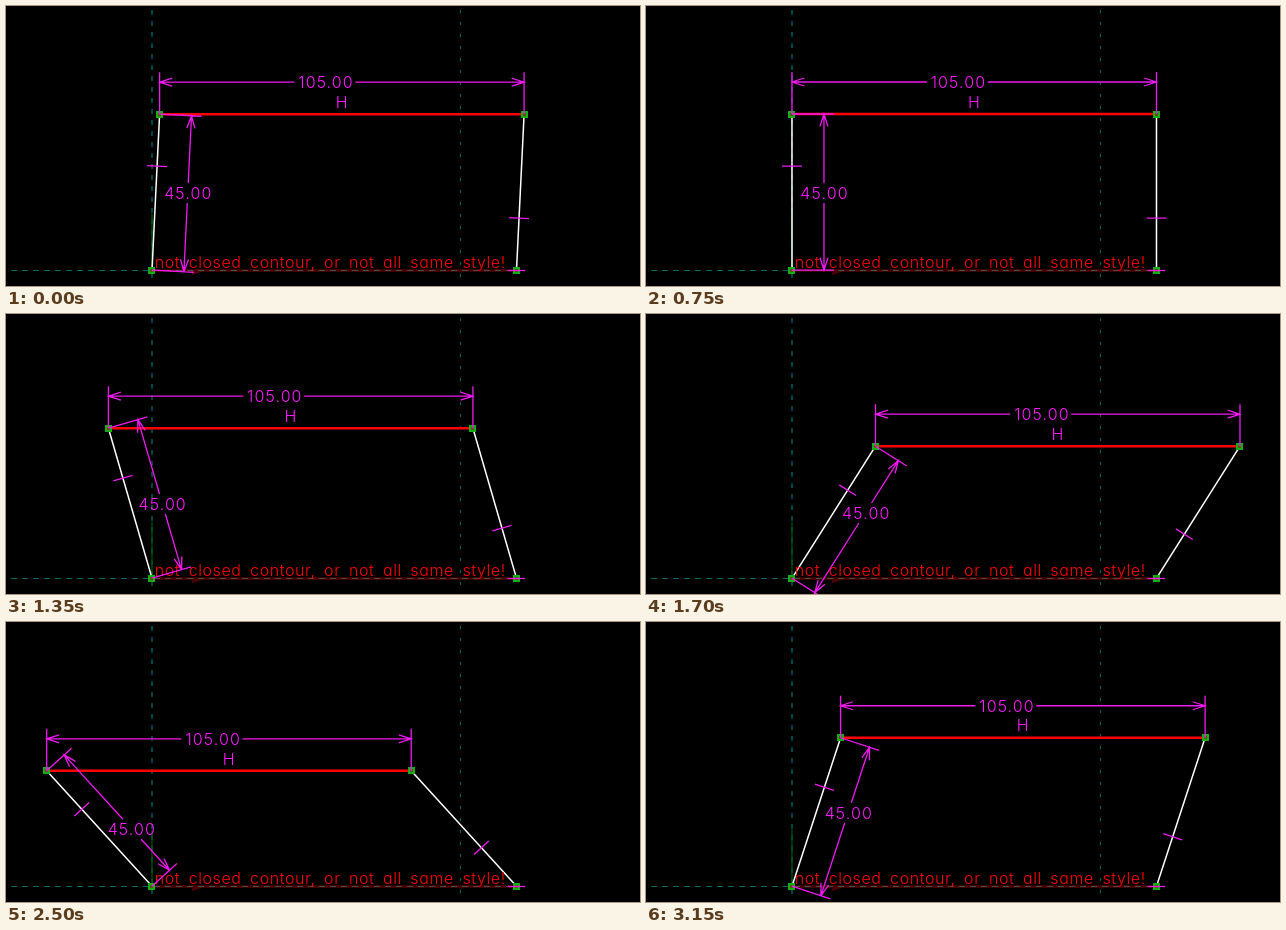
These frames come from a looping animation (634x280 px, 3200 ms). An HTML page:

```html
<!DOCTYPE html>
<html lang="en">
<head>
<meta charset="utf-8">
<title>Parallelogram linkage sketch</title>
<style>
  html, body { margin: 0; width: 100%; height: 100%; overflow: hidden; background: #000; }
  svg { display: block; width: 634px; height: 280px; }
  path { fill: none; }
  text { font: 300 16px Inter, "Open Sans", sans-serif; font-feature-settings: "cv11"; }
  .axis { stroke: #006a66; }
  .dim { stroke: #f01af0; stroke-width: 1.3; }
  .label { fill: #ff1aff; text-anchor: middle; letter-spacing: 1.1px; }
  .note { fill: #ff0000; letter-spacing: .6px; word-spacing: 3.4px; }
  .bar { stroke: #fff; stroke-width: 1.5; }
  .base { stroke: #f00; stroke-width: 2.5; opacity: .3; }
  .top { stroke: #f00; stroke-width: 2.5; }
  .top.faint { stroke: #a83c3c; stroke-width: 2; }
  .pin { fill: #12b012; }
  .core { fill: #6a4a18; }
</style>
</head>
<body>
<svg viewBox="0 0 634 280">
  <path class="axis" d="M5 264.5H520" stroke-dasharray="6 5"/>
  <path class="axis" d="M146 4V272" stroke-width="1.3" stroke-dasharray="5 6"/>
  <path class="axis" d="M454.5 4V272" stroke-dasharray="3 9"/>
  <path d="M146 208V264" stroke="#005000" stroke-width="1.3"/>
  <path class="base" d="M146 264.5H510.5M186 268L196 264"/>
  <path class="bar" id="bars"/>
  <path class="top" id="top"/>
  <g id="pins"></g>
  <text class="note" x="148.7" y="262.3">not closed contour, or not all same style!</text>
  <path class="dim" d="M502 264.5H519"/>
  <path class="dim" id="dims"/>
  <text class="label" id="width">105.00</text>
  <text class="label" id="length">45.00</text>
  <text class="label" id="level">H</text>
</svg>
<script>
const LOOP = 3200, STEP = 50, ARM = 156.2, SPAN = 364.5;
const A = [146, 264.2], D = [A[0] + SPAN, A[1]];

// time in ms, sideways lean of the arm in px
const keys = [
  [0, 7.6], [150, 92], [300, 123], [350, 123], [500, 103.3], [550, 80.5], [800, -18],
  [1000, -80], [1100, -95.5], [1150, -95.5], [1250, -80], [1500, 24], [1700, 83.5],
  [1800, 105], [1900, 105], [2000, 70], [2150, -16], [2250, -62], [2400, -93],
  [2500, -105.3], [2600, -105.3], [2750, -80], [2950, -17], [3150, 48.6]
];

const $ = id => document.getElementById(id);
const slope = i => (keys[i + 1][1] - keys[i][1]) / (keys[i + 1][0] - keys[i][0]);

// harmonic mean of neighbouring slopes keeps the curve free of overshoot
function tangent(i) {
  if (i === 0) return slope(0);
  if (i === keys.length - 1) return slope(i - 1);
  const a = slope(i - 1), b = slope(i);
  return a * b > 0 ? 2 * a * b / (a + b) : 0;
}

function lean(t) {
  let i = 0;
  while (i < keys.length - 2 && t >= keys[i + 1][0]) i++;
  const [t0, x0] = keys[i], [t1, x1] = keys[i + 1];
  const h = t1 - t0, s = (t - t0) / h, r = 1 - s;
  return x0 * r * r * (1 + 2 * s) + x1 * s * s * (3 - 2 * s)
    + h * s * r * (tangent(i) * r - tangent(i + 1) * s);
}

const add = (p, v, k = 1) => [p[0] + v[0] * k, p[1] + v[1] * k];
const mix = (p, q, k) => [p[0] + (q[0] - p[0]) * k, p[1] + (q[1] - p[1]) * k];
const line = (...pts) => "M" + pts.map(p => p.map(n => n.toFixed(2)).join(" ")).join("L");

// head at p, opening along the unit vector v
function arrow(p, v) {
  const n = [-v[1], v[0]], base = add(p, v, 12.4);
  return line(add(base, n, 4), p, add(base, n, -4));
}

function place(id, x, y) {
  $(id).setAttribute("x", x.toFixed(2));
  $(id).setAttribute("y", y.toFixed(2));
}

const pins = [0, 1, 2, 3].map(() => {
  const g = document.createElementNS("http://www.w3.org/2000/svg", "g");
  g.innerHTML = '<rect class="pin" x="-3.5" y="-3.5" width="7" height="7"/>' +
    '<rect class="core" x="-1.5" y="-1.5" width="3" height="3"/>';
  $("pins").append(g);
  return g;
});

function draw(t) {
  const dx = lean(t), dy = -Math.sqrt(ARM * ARM - dx * dx);
  const B = add(A, [dx, dy]), C = add(B, [SPAN, 0]);
  const u = [dx / ARM, dy / ARM], n = [-u[1], u[0]];

  $("bars").setAttribute("d", line(A, B) + line(D, C));
  $("top").setAttribute("d", line(B, C));
  $("top").classList.toggle("faint", t >= 450 && t < 550);
  [A, B, C, D].forEach((p, i) => pins[i].setAttribute("transform",
    `translate(${Math.ceil(p[0]) - .5} ${Math.floor(p[1]) + .5})`));

  // horizontal dimension
  const l = B[0], r = C[0], h = B[1] - 32, mid = (l + r) / 2, gap = mid - 17;
  let d = line(B, [l, h - 10]) + line(C, [r, h - 10])
    + line([l, h], [gap - 30.5, h]) + line([gap + 30.5, h], [r, h])
    + arrow([l, h], [1, 0]) + arrow([r, h], [-1, 0]);
  place("width", gap + 1.2, h + 6.2);
  place("level", mid + .3, h + 25.7);

  // aligned dimension, broken around its label
  const off = 32 * n[0], p = add(A, n, off), q = add(B, n, off);
  const c = add(mix(A, B, .5), [32, .8]);
  const cut = k => mix(p, q, (p[1] - c[1] - k) / (p[1] - q[1]));
  d += line(A, add(p, n, 10)) + line(B, add(q, n, 10))
    + line(p, cut(10)) + line(cut(-10), q)
    + arrow(p, u) + arrow(q, [-u[0], -u[1]]);
  place("length", c[0] + .5, c[1] + 6);

  // equal-length ticks
  for (const m of [mix(B, A, 1 / 3), mix(D, C, 1 / 3)])
    d += line(add(m, n, -10), add(m, n, 10));
  $("dims").setAttribute("d", d);
}

const start = performance.now();
function tick() {
  const t = (performance.now() - start) % LOOP;
  draw(Math.floor(t / STEP) * STEP);
  requestAnimationFrame(tick);
}
tick();
</script>
</body>
</html>
```
